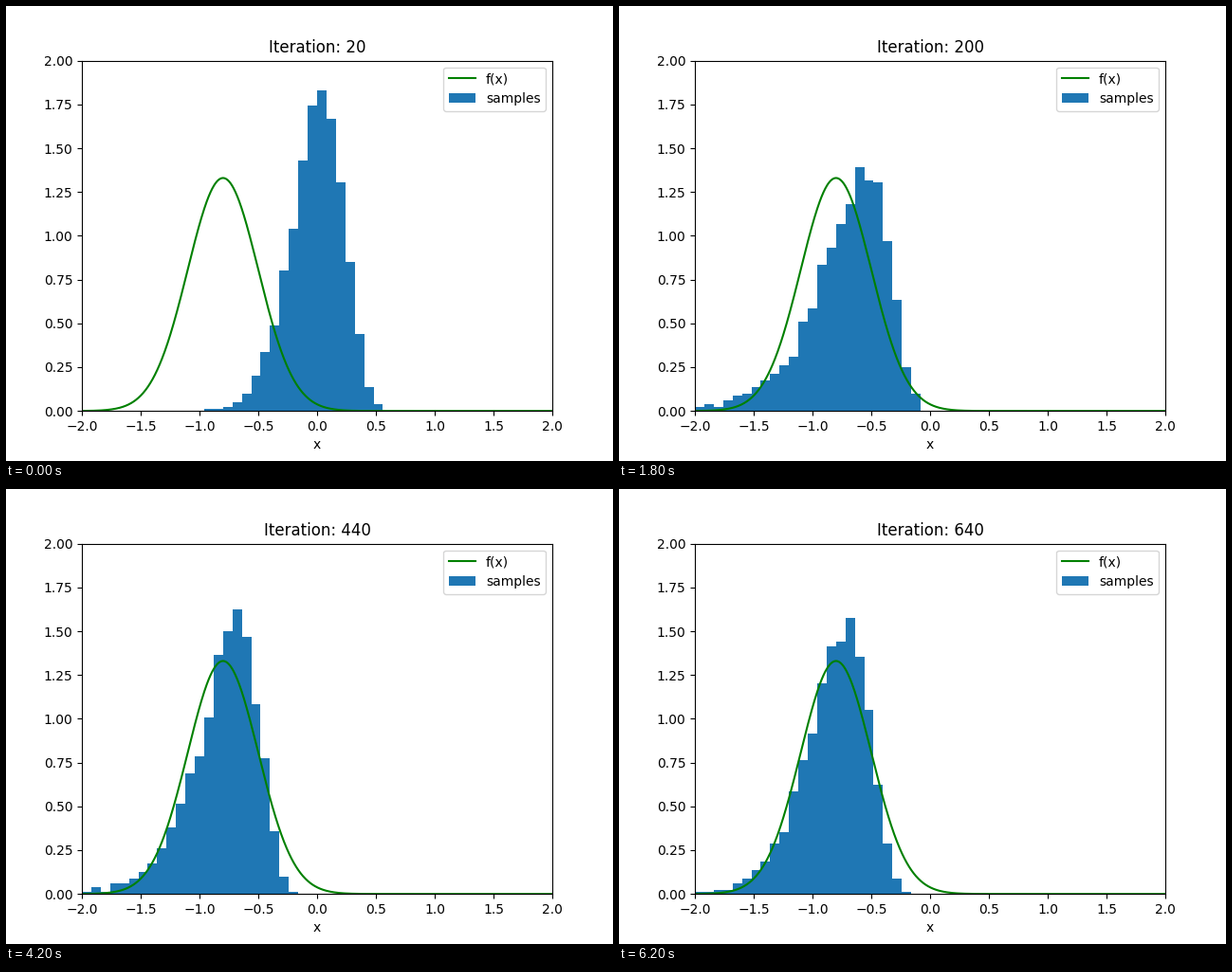
A matplotlib script for the animation above (6400 ms loop, 640 px wide and 480 px high).

```python
import math

import numpy as np
import matplotlib.pyplot as plt
from matplotlib.animation import FuncAnimation

FRAMES, INTERVAL = 32, 200
STEP = 20            # training iterations per frame
SAMPLES, BINS = 1000, 50
EDGES = np.linspace(-2, 2, BINS + 1)
WIDTH = EDGES[1] - EDGES[0]

# The samples follow a left-skewed bell that drifts towards f(x).
KEY_FRAMES = [0, 5, 9, 14, 24, 31]
MEDIAN = [0.005, -0.402, -0.663, -0.758, -0.776, -0.783]
SPREAD = [0.222, 0.27, 0.32, 0.29, 0.266, 0.265]
SKEW = [0.19, 0.60, 0.41, 0.33, 0.32, 0.28]


def normal_cdf(z):
    return 0.5 * (1 + math.erf(z / math.sqrt(2)))


def sample_share(edges, median, spread, skew):
    """Share of samples below each edge, for x = m + w/s * (1 - exp(-s*z))."""
    rest = np.maximum(1 - skew * (edges - median) / spread, 1e-9)
    return np.array([normal_cdf(z) for z in -np.log(rest) / skew])


def histogram(frame):
    median, spread, skew = (np.interp(frame, KEY_FRAMES, values)
                            for values in (MEDIAN, SPREAD, SKEW))
    counts = SAMPLES * np.diff(sample_share(EDGES, median, spread, skew))
    noise = np.random.default_rng(frame).normal(size=BINS)
    counts = np.round(np.maximum(counts + 0.4 * np.sqrt(counts) * noise, 0))
    return counts / (counts.sum() * WIDTH)


fig, ax = plt.subplots(figsize=(6.4, 4.8), dpi=100)
bars = ax.bar(EDGES[:-1], histogram(0), WIDTH, align="edge", label="samples")
x = np.linspace(-2, 2, 1000)
density = np.exp(-0.5 * ((x + 0.8) / 0.3) ** 2) / (0.3 * np.sqrt(2 * np.pi))
ax.plot(x, density, color="green", label="f(x)")
ax.set(xlim=(-2, 2), ylim=(0, 2), xlabel="x")
ax.legend(loc="upper right")
title = ax.set_title("")


def update(frame):
    for bar, height in zip(bars, histogram(frame)):
        bar.set_height(height)
    title.set_text(f"Iteration: {STEP * (frame + 1)}")
    return [*bars, title]


anim = FuncAnimation(fig, update, frames=FRAMES, interval=INTERVAL, repeat=True)
plt.show()
```
